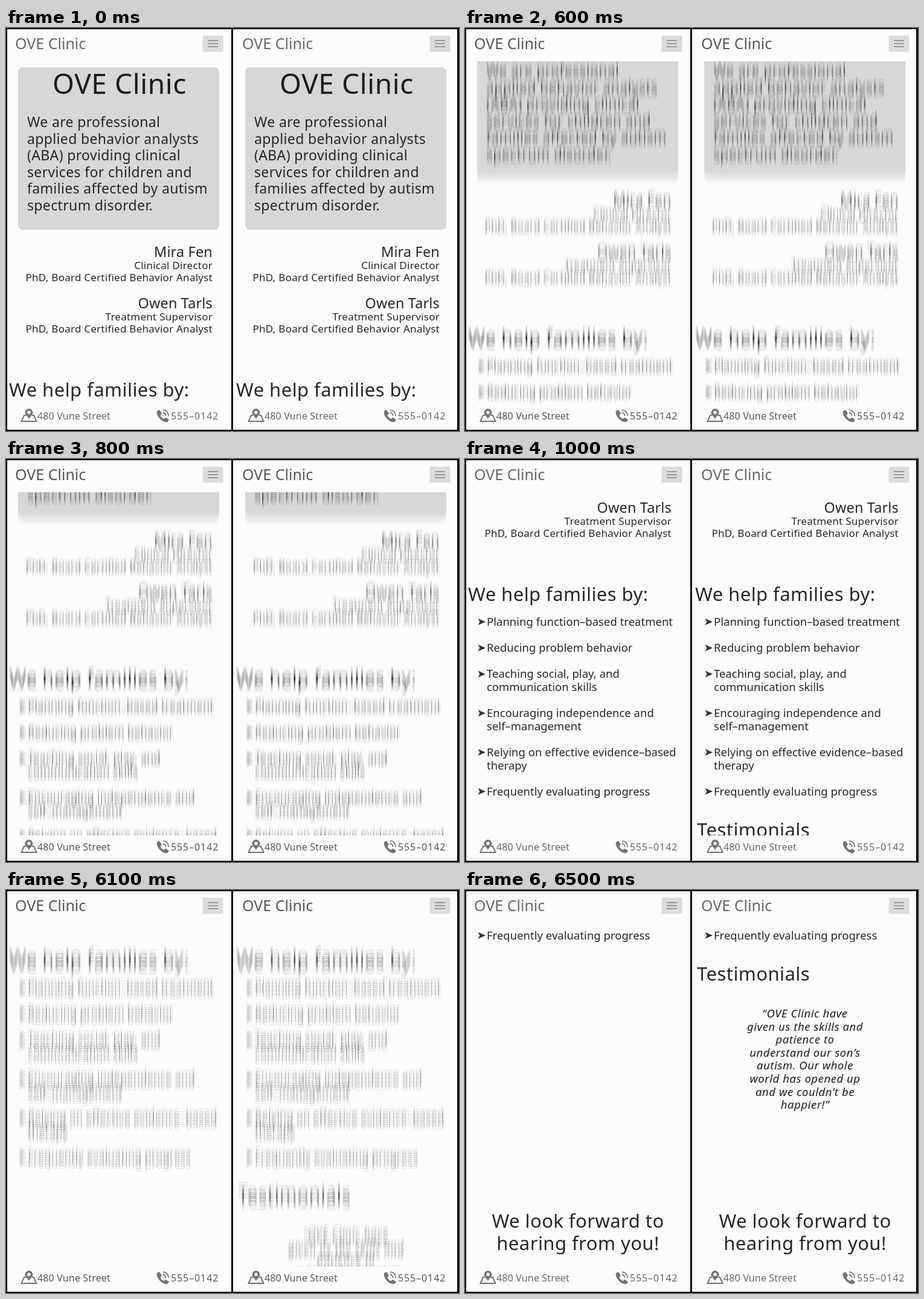
These frames come from a looping animation (750x667 px, 8000 ms). An HTML page with a canvas:

```html
<!DOCTYPE html>
<html lang="en">
<head>
<meta charset="utf-8">
<title>Clinic mobile page</title>
<style>
  html, body { margin: 0; width: 100%; height: 100%; overflow: hidden; background: #000; }
  canvas { display: block; }
</style>
</head>
<body>
<canvas id="stage" width="750" height="667"></canvas>
<script>
const CLINIC = 'OVE Clinic';
const PAPER = '#fcfcfc';
const INK = '#262626';
const PANEL_WIDTH = 373, PANEL_GAP = 376, PAGE_HEIGHT = 1520;
const VIEW_TOP = 55, VIEW_BOTTOM = 623;
const LOOP = 8000, STEP_TIME = 100;
const BLUR_COPIES = 8, SHUTTER = 0.26, BLUR_GAMMA = 1.6;
const SCROLLS = [
  { start: 500, end: 1000, from: 0, to: 375 },
  { start: 6000, end: 6500, from: 375, to: 850 }
].map(s => ({ ...s, step: (s.to - s.from) * STEP_TIME / (s.end - s.start) }));

const stage = document.getElementById('stage').getContext('2d');

function write(ctx, text, x, y, size, { align = 'left', spacing = 0, style = '', color = INK } = {}) {
  ctx.font = `${style} ${size}px "Noto Sans", "Open Sans", sans-serif`;
  ctx.letterSpacing = spacing + 'px';
  ctx.textAlign = align;
  ctx.fillStyle = color;
  ctx.fillText(text, x, y);
}

function roundBox(ctx, x, y, w, h, radius, color) {
  ctx.fillStyle = color;
  ctx.beginPath();
  ctx.roundRect(x, y, w, h, radius);
  ctx.fill();
}

function person(ctx, name, role, y) {
  const small = { align: 'right', spacing: 0.25 };
  write(ctx, name, 342, y, 23.4, { align: 'right', spacing: 0.2 });
  write(ctx, role, 342, y + 20, 17, small);
  write(ctx, 'PhD, Board Certified Behavior Analyst', 342, y + 40, 17, small);
}

function bulletList(ctx, items, top, lineHeight) {
  let y = top;
  for (const lines of items) {
    const mid = y - 6.5;
    ctx.fillStyle = '#333';
    ctx.beginPath();
    ctx.moveTo(21.5, mid - 5.5);
    ctx.lineTo(34, mid);
    ctx.lineTo(21.5, mid + 5.5);
    ctx.lineTo(24.5, mid);
    ctx.fill();
    for (const line of lines) {
      write(ctx, line, 36, y, 18.4, { spacing: 0.07 });
      y += lineHeight;
    }
    y += lineHeight;
  }
}

function makeCanvas() {
  const canvas = document.createElement('canvas');
  canvas.width = PANEL_WIDTH;
  canvas.height = PAGE_HEIGHT;
  return canvas.getContext('2d', { willReadFrequently: true });
}

function makePage(withTestimonials) {
  const ctx = makeCanvas();
  const heading = { spacing: 0.45 };
  const centered = { spacing: 0.45, align: 'center' };
  ctx.fillStyle = PAPER;
  ctx.fillRect(0, 0, PANEL_WIDTH, PAGE_HEIGHT);

  roundBox(ctx, 20, 65, 333, 269, 8, '#d7d7d7');
  write(ctx, CLINIC, 188, 109, 46, { align: 'center', spacing: 0.6, color: '#1c1c1c' });
  [
    'We are professional',
    'applied behavior analysts',
    '(ABA) providing clinical',
    'services for children and',
    'families affected by autism',
    'spectrum disorder.'
  ].forEach((line, i) => write(ctx, line, 35, 164 + i * 27.6, 23, { spacing: 0.35 }));

  person(ctx, 'Mira Fen', 'Clinical Director', 379);
  person(ctx, 'Owen Tarls', 'Treatment Supervisor', 464);

  write(ctx, 'We help families by:', 5, 610, 31, heading);
  bulletList(ctx, [
    ['Planning function–based treatment'],
    ['Reducing problem behavior'],
    ['Teaching social, play, and', 'communication skills'],
    ['Encouraging independence and', 'self–management'],
    ['Relying on effective evidence–based', 'therapy'],
    ['Frequently evaluating progress']
  ], 651, 21.6);

  if (withTestimonials) {
    write(ctx, 'Testimonials', 8, 1000, 31, heading);
    [
      `“${CLINIC} have`,
      'given us the skills and',
      'patience to',
      'understand our son’s',
      'autism. Our whole',
      'world has opened up',
      'and we couldn’t be',
      'happier!”'
    ].forEach((line, i) => write(ctx, line, 187, 1061 + i * 21.6, 18.4,
      { align: 'center', style: 'italic', spacing: 0.6, color: '#1c1c1c' }));
  }

  write(ctx, 'We look forward to', 187, 1409, 31, centered);
  write(ctx, 'hearing from you!', 187, 1446, 31, centered);
  return ctx;
}

// Averages copies of the page shifted upwards, mixing them as light rather than as ink.
function smearPage(page, length) {
  const image = page.getImageData(0, 0, PANEL_WIDTH, PAGE_HEIGHT);
  const source = image.data.slice();
  const light = Array.from({ length: 256 }, (_, v) => v ** BLUR_GAMMA);
  const rowBytes = PANEL_WIDTH * 4;
  const shifts = Array.from({ length: BLUR_COPIES },
    (_, i) => Math.round(length * i / (BLUR_COPIES - 1)) * rowBytes);
  const end = source.length - shifts[BLUR_COPIES - 1];
  for (let p = 0; p < end; p++) {
    let sum = 0;
    for (const shift of shifts) sum += light[source[p + shift]];
    image.data[p] = (sum / BLUR_COPIES) ** (1 / BLUR_GAMMA);
  }
  const smeared = makeCanvas();
  smeared.putImageData(image, 0, 0);
  return smeared.canvas;
}

function menuButton(ctx) {
  roundBox(ctx, 325, 12, 35, 28, 3, '#efefef');
  roundBox(ctx, 326, 13, 33, 26, 2, '#dcdcdc');
  ctx.fillStyle = '#8c8c8c';
  for (const y of [20, 25, 30]) ctx.fillRect(334, y, 17, 1.6);
}

function mapIcon(ctx, color) {
  ctx.strokeStyle = ctx.fillStyle = color;
  ctx.lineWidth = 2;
  ctx.stroke(new Path2D('M33 641H30L25.5 651H50.5L46 641H43'));
  ctx.fill(new Path2D('M38 647C36 643 31.5 640 31.5 636.5A6.5 6.5 0 0 1 44.5 636.5C44.5 640 40 643 38 647Z'));
  ctx.fillStyle = PAPER;
  ctx.beginPath();
  ctx.arc(38, 636.3, 2.8, 0, Math.PI * 2);
  ctx.fill();
}

function phoneIcon(ctx, color) {
  ctx.strokeStyle = ctx.fillStyle = color;
  ctx.fill(new Path2D('M250 634L254 632L258 638L255.5 641Q257 645.5 261.5 647L264.5 644.5L270 648.5L267.5 652Q262 653.5 255.5 647.5Q248 640 250 634Z'));
  ctx.lineWidth = 1.8;
  for (const radius of [5, 9.5]) {
    ctx.beginPath();
    ctx.arc(259.5, 641.5, radius, -1.5, 0.1);
    ctx.stroke();
  }
}

function drawBars(ctx, moving) {
  const color = moving ? '#575757' : '#686868';
  write(ctx, CLINIC, 15, 35, 25, { color });
  menuButton(ctx);
  mapIcon(ctx, '#747474');
  write(ctx, '480 Vune Street', 52, 648, 16, { color, spacing: 0.15 });
  phoneIcon(ctx, '#747474');
  write(ctx, '555–0142', 273, 648, 16, { color, spacing: 0.9 });
}

// Each panel holds its sharp page and one smeared page per scroll.
const panels = [false, true].map(withTestimonials => {
  const page = makePage(withTestimonials);
  return {
    sharp: page.canvas,
    smeared: SCROLLS.map(({ step }) => smearPage(page, step * SHUTTER))
  };
});

// Scrolling advances in even steps.
function scrollAt(time) {
  const active = SCROLLS.findIndex(s => time >= s.start && time < s.end);
  if (active >= 0) {
    const { start, from, step } = SCROLLS[active];
    return { active, position: from + step * Math.floor((time - start) / STEP_TIME) };
  }
  const done = SCROLLS.filter(s => time >= s.end).pop();
  return { active, position: done ? done.to : 0 };
}

function drawPanel(ctx, { sharp, smeared }, { active, position }) {
  const moving = active >= 0;
  const viewHeight = VIEW_BOTTOM - VIEW_TOP;
  ctx.fillStyle = PAPER;
  ctx.fillRect(0, 2, PANEL_WIDTH, 663);
  ctx.drawImage(moving ? smeared[active] : sharp,
    0, position + VIEW_TOP, PANEL_WIDTH, viewHeight,
    0, VIEW_TOP, PANEL_WIDTH, viewHeight);
  drawBars(ctx, moving);
}

function render(time) {
  const scroll = scrollAt(time);
  stage.fillStyle = '#000';
  stage.fillRect(0, 0, 750, 667);
  panels.forEach((panel, i) => {
    stage.save();
    stage.translate(i * PANEL_GAP, 0);
    drawPanel(stage, panel, scroll);
    stage.restore();
  });
  stage.fillStyle = '#000';
  stage.fillRect(0, 0, 2, 667);
  stage.fillRect(747, 0, 3, 667);
}

const begun = performance.now();
function tick() {
  render((performance.now() - begun) % LOOP);
  requestAnimationFrame(tick);
}
tick();
</script>
</body>
</html>
```
